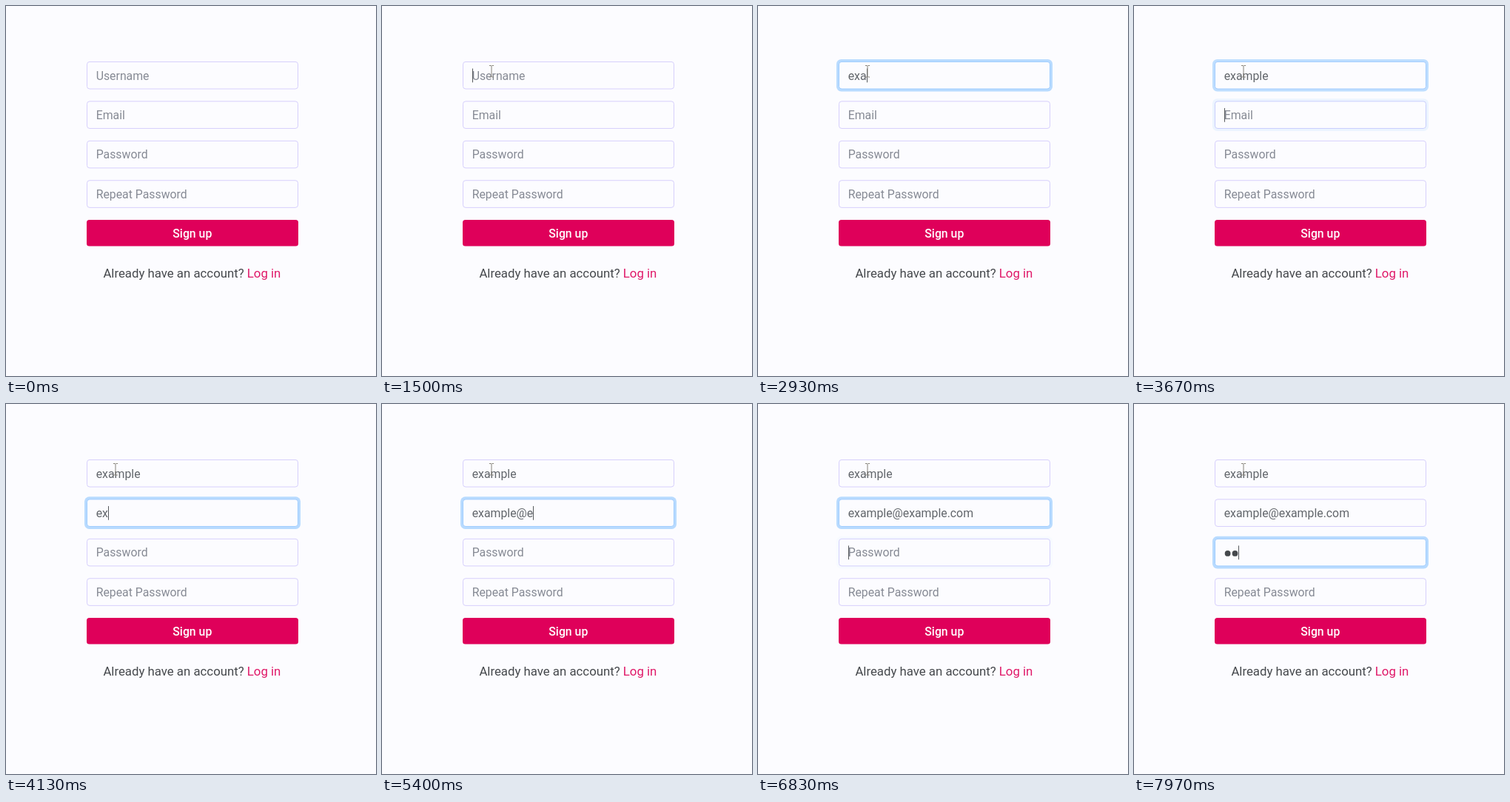
Recreate the animation shown at these times as an HTML page. Size 500 by 500 pixels, loop 8 s.

```html
<!DOCTYPE html>
<html lang="en">
<head>
<meta charset="utf-8">
<title>Sign up form</title>
<style>
  html, body { margin: 0; width: 100%; height: 100%; overflow: hidden; background: #fcfcff; }
  svg { display: block; width: 100vw; height: 100vh; }
  text { font: 15.84px Roboto, sans-serif; white-space: pre; }
  .hint { fill: #868a94; }
  .value { fill: #62666b; }
  .button { fill: #fff; font-weight: 500; text-anchor: middle; }
  .footer { fill: #45484c; font-size: 16.8px; }
  .link { fill: #e01868; }
</style>
</head>
<body>
<svg id="stage" viewBox="0 0 500 500">
  <g id="form"></g>
  <rect x="109" y="289" width="286" height="35.6" rx="3.5" fill="#df005a"/>
  <text class="button" x="251.8" y="312.6">Sign up</text>
  <text class="footer" x="131.4" y="367.4">Already have an account? <tspan class="link">Log in</tspan></text>
  <path id="pointer" d="M145 80.5H147.2L148 81.3L148.8 80.5H151M148 81.3V95.2M145 96H147.2L148 95.2L148.8 96H151"
        fill="none" stroke="#858178" stroke-width="1"/>
</svg>
<script>
const LOOP = 8000;
const LEFT = 121.7;
const NEVER = 1e9;
const BORDER = [214, 207, 252];
const BORDER_ON = [158, 204, 255];

// focus / blur: when the field is active; keys: time of each keystroke
const fields = [
  { hint: "Username", value: "example", focus: 1490, blur: 3600,
    keys: [2560, 2690, 2830, 2960, 3100, 3240, 3390] },
  { hint: "Email", value: "example@example.com", focus: 3600, blur: 6800,
    keys: [3990, 4070, 4250, 4390, 4540, 4680, 4820, 5060, 5290, 5420,
           5550, 5670, 5800, 5890, 6030, 6170, 6330, 6480, 6620] },
  { hint: "Password", value: "••", secret: true, focus: 6790, blur: NEVER,
    keys: [7790, 7895] },
  { hint: "Repeat Password", value: "", focus: NEVER, blur: NEVER, keys: [] }
];

const clamp = x => Math.max(0, Math.min(1, x));
const ramp = (t, start, length) => clamp((t - start) / length);
const ease = x => x * x * (3 - 2 * x);
const mix = (a, b, k) => `rgb(${a.map((v, i) => Math.round(v + (b[i] - v) * k))})`;

function add(parent, tag, attrs = {}) {
  const el = document.createElementNS("http://www.w3.org/2000/svg", tag);
  for (const name in attrs) el.setAttribute(name, attrs[name]);
  return parent.appendChild(el);
}

function build(field, i) {
  const form = document.getElementById("form");
  const y = 74.9 + i * 53.45;
  const base = y + 24.6;
  field.glow = add(form, "rect", { x: 106, y: y - 3, width: 292, height: 43.6, rx: 6.5, fill: "#b8dbff" });
  field.box = add(form, "rect", { x: 109.5, y: y + 0.5, width: 285, height: 36.6, rx: 3.5, fill: "#fcfcff" });
  field.label = add(form, "text", { x: LEFT, y: base, class: "hint" });
  field.label.textContent = field.hint;
  if (field.secret) {
    field.dots = field.keys.map((_, n) =>
      add(form, "circle", { cx: 126.6 + n * 9.9, cy: y + 20.1, r: 3.9, fill: "#45484c" }));
  } else {
    field.text = add(form, "text", { x: LEFT, y: base, class: "value" });
    field.typed = add(field.text, "tspan");
    field.fresh = add(field.text, "tspan");
  }
  field.caret = add(form, "rect", { y: y + 9.6, width: 1, height: 18.8, fill: "#55585c" });
}

function caretOpacity(field, t) {
  if (t < field.focus || t >= field.blur) return 0;
  const last = field.keys.filter(k => k <= t).pop() ?? field.focus;
  const phase = (t - last) % 1040;
  return phase < 520 ? 1 : 1 - ramp(phase, 510, 60);
}

function drawField(field, t) {
  const glow = ease(ramp(t, field.focus + 10, 190)) * (1 - ease(ramp(t, field.blur + 35, 190)));
  field.glow.setAttribute("opacity", glow);
  field.box.setAttribute("stroke", mix(BORDER, BORDER_ON, glow));

  const count = field.keys.filter(k => k <= t).length;
  const show = count ? ramp(t, field.keys[count - 1], 60) : 0;
  field.label.setAttribute("opacity", count > 1 ? 0 : 1 - show);

  let width = 0;
  if (field.secret) {
    field.dots.forEach((dot, n) => dot.setAttribute("opacity", ramp(t, field.keys[n], 60)));
    width = count * 9.7;
  } else {
    field.typed.textContent = field.value.slice(0, Math.max(0, count - 1));
    field.fresh.textContent = count ? field.value[count - 1] : "";
    field.fresh.setAttribute("fill-opacity", show);
    if (count) width = field.text.getComputedTextLength();
  }
  field.caret.setAttribute("x", Math.round(LEFT + width));
  field.caret.setAttribute("opacity", caretOpacity(field, t));
}

function draw(t) {
  fields.forEach(field => drawField(field, t));
  document.getElementById("pointer").setAttribute("opacity", t >= 1490 ? 1 : 0);
}

fields.forEach(build);
const began = performance.now();
function tick() {
  draw((performance.now() - began) % LOOP);
  requestAnimationFrame(tick);
}
tick();
</script>
</body>
</html>
```
